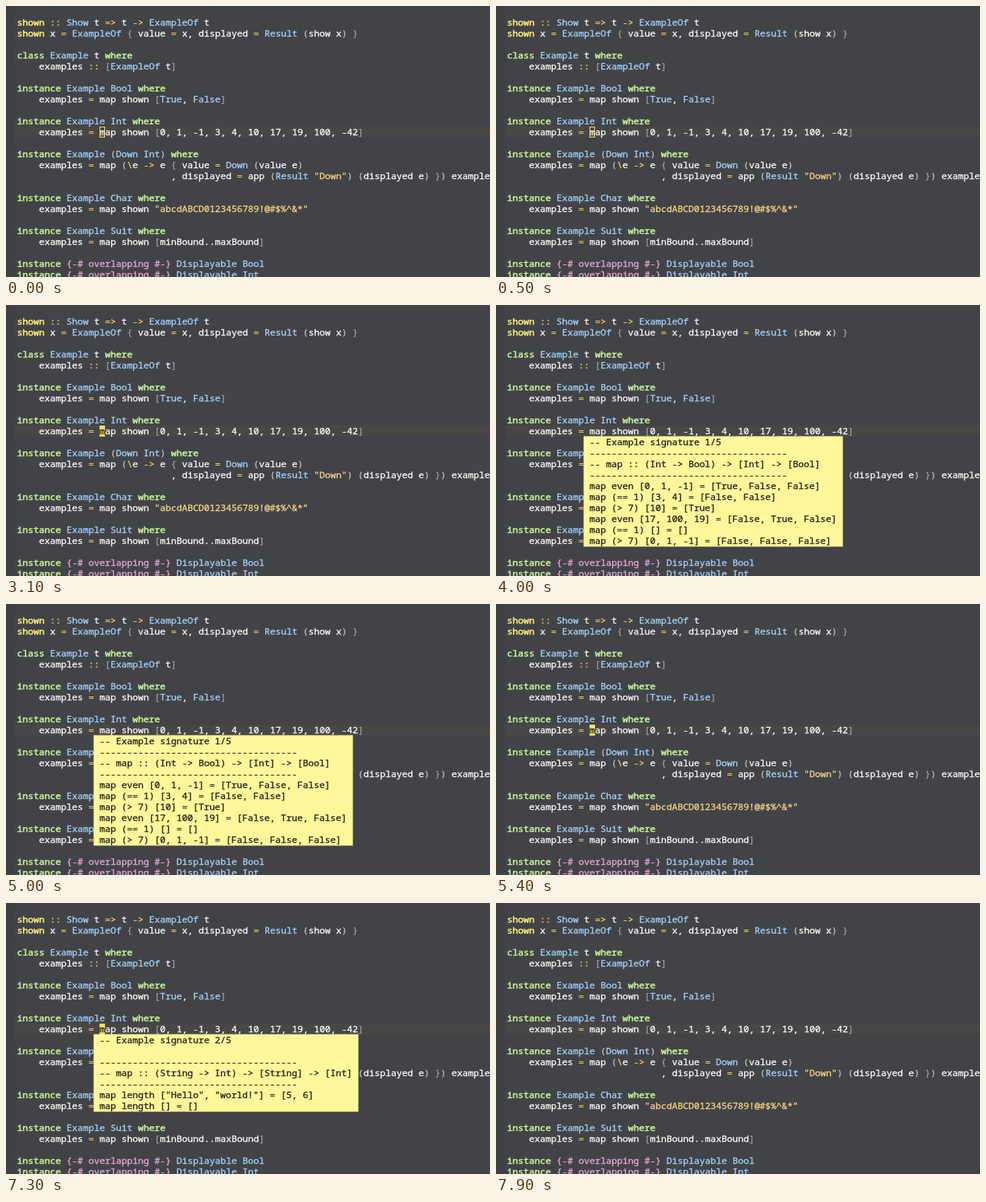
An HTML page that plays this animation: 616x346 px, repeating every 8 s.

```html
<!DOCTYPE html>
<html lang="en">
<head>
<meta charset="utf-8">
<title>Example signatures</title>
<style>
  html, body { margin: 0; width: 100%; height: 100%; overflow: hidden; background: #424347; }
  svg { display: block; width: 616px; height: 346px; }
  text {
    font: 500 11.667px "Noto Sans Mono", "DejaVu Sans Mono", monospace;
    font-variant-ligatures: none;
    white-space: pre;
    color: #fafaf8;
    fill: currentColor;
    stroke: currentColor;
    stroke-width: 0.3px;
  }
  .fn { color: #fff07a; stroke-width: 0.5px; }
  .kw { color: #c8f79a; stroke-width: 0.5px; }
  .type { color: #a6d2fb; }
  .op { color: #f6cd62; }
  .str { color: #f4d586; }
  .prag { color: #e8a9da; }
  .brace { color: #a9abae; stroke-width: 0.1px; }
  .paren { color: #d4d5d7; stroke-width: 0.1px; }
  .popup rect { fill: #fff799; }
  .popup text, #solid text { color: #222; }
</style>
</head>
<body>
<svg id="stage" viewBox="0 0 616 346">
  <rect width="616" height="346" fill="#424347"/>
  <rect width="11" height="346" fill="#3f4044"/>
  <rect x="12" y="154" width="604" height="14" fill="#474746"/>
  <g id="code"></g>
  <rect id="hollow" x="119.5" y="154.5" width="6" height="13" fill="none" stroke="#f3e04a"/>
  <g id="solid"><rect x="119" y="154" width="7" height="14" fill="#f5e25a"/></g>
</svg>
<script>
const CELL = 7, LINE = 14, LEFT = 14, TOP = 14, BASE = 11, LOOP = 8000;

const code = String.raw`shown :: Show t => t -> ExampleOf t
shown x = ExampleOf { value = x, displayed = Result (show x) }

class Example t where
    examples :: [ExampleOf t]

instance Example Bool where
    examples = map shown [True, False]

instance Example Int where
    examples = map shown [0, 1, -1, 3, 4, 10, 17, 19, 100, -42]

instance Example (Down Int) where
    examples = map (\e -> e { value = Down (value e)
                            , displayed = app (Result "Down") (displayed e) }) examples

instance Example Char where
    examples = map shown "abcdABCD0123456789!@#$%^&*"

instance Example Suit where
    examples = map shown [minBound..maxBound]

instance {-# overlapping #-} Displayable Bool
instance {-# overlapping #-} Displayable Int`.split("\n");

const rule = "-".repeat(36);
const notes = [
  { cols: 47, lines: [
    "-- Example signature 1/5",
    rule,
    "-- map :: (Int -> Bool) -> [Int] -> [Bool]",
    rule,
    "map even [0, 1, -1] = [True, False, False]",
    "map (== 1) [3, 4] = [False, False]",
    "map (> 7) [10] = [True]",
    "map even [17, 100, 19] = [False, True, False]",
    "map (== 1) [] = []",
    "map (> 7) [0, 1, -1] = [False, False, False]"
  ] },
  { cols: 48, lines: [
    "-- Example signature 2/5",
    "",
    rule,
    "-- map :: (String -> Int) -> [String] -> [Int]",
    rule,
    'map length ["Hello", "world!"] = [5, 6]',
    "map length [] = []"
  ] }
];

// start time, cursor style, open popup (0 = none)
const steps = [
  [0, "hollow", 0], [2000, "solid", 0], [2500, "off", 0], [2900, "solid", 0],
  [3400, "off", 0], [3500, "solid", 1], [4000, "off", 1], [4400, "solid", 1],
  [5000, "off", 1], [5200, "solid", 0], [5500, "solid", 2], [5900, "off", 2],
  [6300, "solid", 2], [6700, "off", 2], [7300, "solid", 2], [7500, "solid", 0],
  [7900, "off", 0]
];

const rules = [
  ["prag", /^\{-#.*?#-\}/],
  ["str", /^"[^"]*"/],
  ["kw", /^(instance|class|where)\b/],
  ["type", /^[A-Z]\w*/],
  ["", /^\w+/],
  ["op", /^(=>|->|::|=|\\)/],
  ["brace", /^[{}[\]]/],
  ["paren", /^[()]/],
  ["", /^[^]/]
];

const $ = id => document.getElementById(id);

function add(parent, tag, attrs, text) {
  const el = document.createElementNS("http://www.w3.org/2000/svg", tag);
  for (const k in attrs) el.setAttribute(k, attrs[k]);
  if (text) el.textContent = text;
  return parent.appendChild(el);
}

const place = (col, row) => ({ x: LEFT + col * CELL, y: TOP + row * LINE + BASE });

function drawLine(line, row) {
  let col = 0;
  while (col < line.length) {
    const rest = line.slice(col);
    const [kind, re] = rules.find(r => r[1].test(rest));
    const word = rest.match(re)[0];
    const cls = row < 2 && col === 0 ? "fn" : kind;
    if (word !== " ") add($("code"), "text", { ...place(col, row), class: cls }, word);
    col += word.length;
  }
}

function drawNote({ cols, lines }) {
  const g = add($("stage"), "g", { class: "popup" });
  add(g, "rect", { x: 111.5, y: 167.5, width: cols * CELL + 1, height: lines.length * LINE + 1 });
  lines.forEach((line, i) => line && add(g, "text", place(15, 11 + i), line));
  return g;
}

code.forEach(drawLine);
add($("solid"), "text", place(15, 10), "m");
const popups = notes.map(drawNote);

const show = (el, on) => el.setAttribute("visibility", on ? "visible" : "hidden");

function render(t) {
  const [, cursor, open] = steps.filter(s => s[0] <= t).pop();
  show($("hollow"), cursor === "hollow");
  show($("solid"), cursor === "solid");
  popups.forEach((p, i) => show(p, open === i + 1));
}

const start = performance.now();
function tick() {
  render((performance.now() - start) % LOOP);
  requestAnimationFrame(tick);
}
tick();
</script>
</body>
</html>
```
